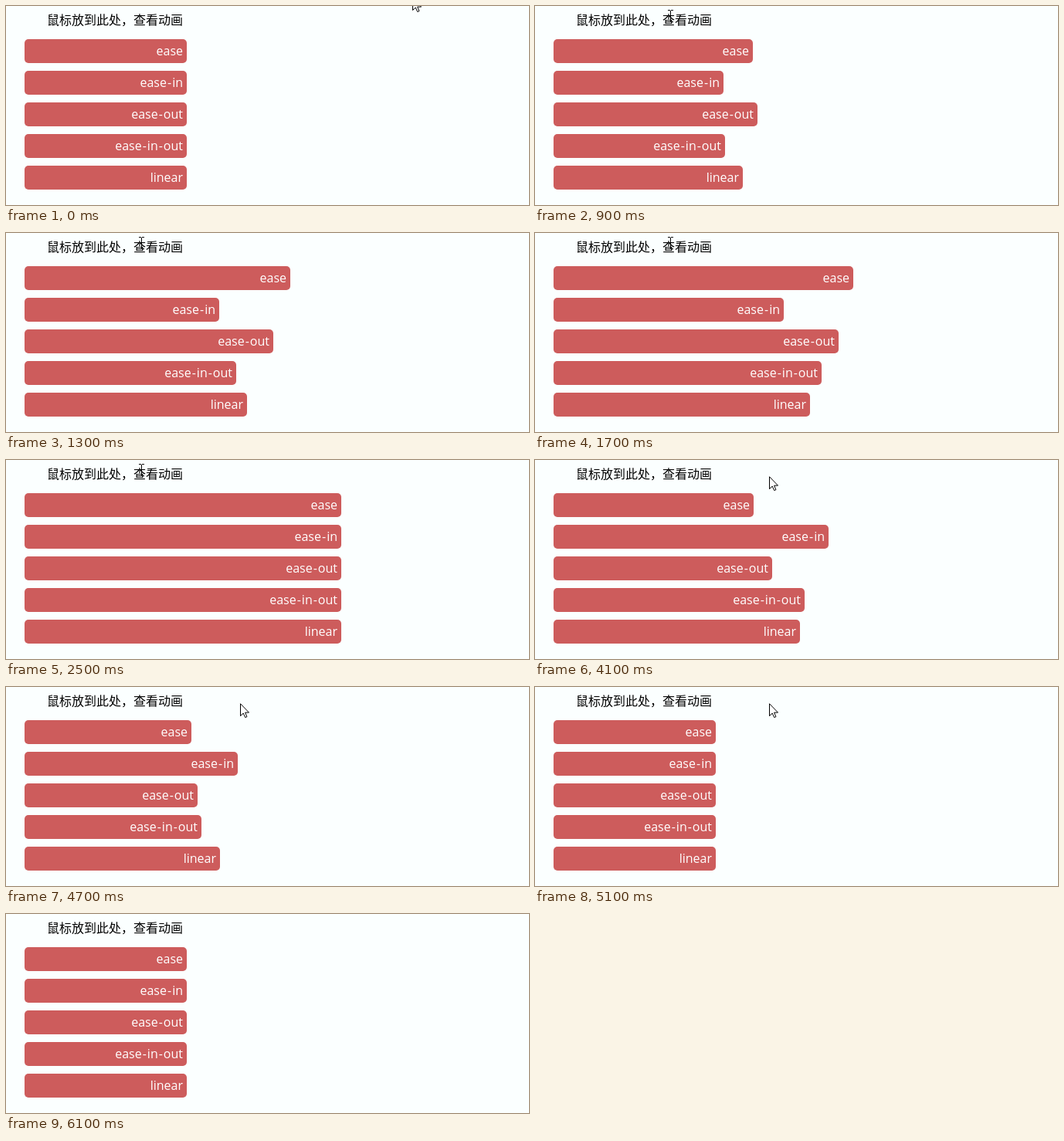
Write an HTML page that moves like this. It is 677 px wide and 258 px high and loops after 7300 ms.

```html
<!DOCTYPE html>
<html lang="zh-CN">
<head>
<meta charset="utf-8">
<title>transition-timing-function</title>
<style>
  html, body {
    margin: 0;
    width: 100%;
    height: 100%;
    overflow: hidden;
    background: #fbffff;
  }
  body { position: relative; }
  h1 {
    position: absolute;
    left: 53px;
    top: 7px;
    margin: 0;
    font: 400 16px/21px "Noto Sans CJK SC", "Noto Sans CJK", sans-serif;
    white-space: nowrap;
    color: #000;
  }
  .bar {
    position: absolute;
    left: 24px;
    box-sizing: border-box;
    width: 210px;
    height: 31px;
    padding-right: 5px;
    border-radius: 5px;
    background: #cd5c5c;
    color: #fff;
    font: 16px/31px "Open Sans", "Noto Sans", sans-serif;
    text-align: right;
    white-space: nowrap;
  }
  .bar span { margin: 0 1px; }
  svg {
    position: absolute;
    left: 0;
    top: 0;
    overflow: visible;
    visibility: hidden;
  }
</style>
</head>
<body>
<h1>鼠标放到此处，查看动画</h1>
<svg id="arrow" width="12" height="19">
  <path d="M.5 .7V16.5L4.2 13L6.7 18.5L8.9 17.6L6.6 12.1H11.5Z" fill="#fff" stroke="#000"/>
</svg>
<svg id="beam" width="7" height="16">
  <path d="M0 .5h3m1 0h3M3.5 1v14M0 15.5h3m1 0h3" fill="none" stroke="#000"/>
</svg>
<script>
  const LOOP = 7300, STEP = 100;
  const GROW = { start: 578, span: 1840 };
  const SHRINK = { start: 3273, span: 1818 };
  const curves = {
    'ease': [.25, .1, .25, 1],
    'ease-in': [.42, 0, 1, 1],
    'ease-out': [0, 0, .58, 1],
    'ease-in-out': [.42, 0, .58, 1],
    'linear': [0, 0, 1, 1]
  };
  // time, shape, x, y
  const pointer = [
    [0, 'arrow', 526, -11],
    [100],
    [500, 'arrow', 238, 21],
    [600, 'beam', 172, 5],
    [3100, 'beam', 198, 9],
    [3200, 'arrow', 238, 21],
    [3300, 'arrow', 251, 16],
    [3400, 'arrow', 303, 21],
    [5600, 'arrow', 414, 21],
    [5700, 'arrow', 560, 4],
    [5800, 'arrow', 611, -1],
    [5900, 'arrow', 635, 10],
    [6000, 'arrow', 666, 13],
    [6100]
  ];

  const bars = Object.entries(curves).map(([name, curve], i) => {
    const el = document.createElement('div');
    el.className = 'bar';
    el.style.top = 43 + 41 * i + 'px';
    el.innerHTML = name.replaceAll('-', '<span>-</span>');
    document.body.append(el);
    return { el, curve };
  });
  const shapes = ['arrow', 'beam'].map(id => document.getElementById(id));
  shapes.forEach(s => document.body.append(s));

  const cubic = (s, a, b) => 3 * s * (1 - s) * ((1 - s) * a + s * b) + s ** 3;

  function bezier(p, [x1, y1, x2, y2]) {
    let lo = 0, hi = 1;
    for (let i = 0; i < 24; i++) {
      const mid = (lo + hi) / 2;
      if (cubic(mid, x1, x2) < p) lo = mid; else hi = mid;
    }
    return cubic(hi, y1, y2);
  }

  function eased(t, phase, curve) {
    const p = (t - phase.start) / phase.span;
    return p <= 0 ? 0 : p >= 1 ? 1 : bezier(p, curve);
  }

  function draw(t) {
    for (const { el, curve } of bars) {
      const grown = eased(t, GROW, curve) - eased(t, SHRINK, curve);
      el.style.width = Math.round(210 + 200 * grown) + 'px';
    }
    const [, id, x, y] = pointer.findLast(k => k[0] <= t);
    for (const s of shapes) {
      const on = s.id === id;
      s.style.visibility = on ? 'visible' : 'hidden';
      if (on) s.style.transform = `translate(${x}px, ${y}px)`;
    }
  }

  const begin = performance.now();
  function tick() {
    const t = (performance.now() - begin) % LOOP;
    draw(Math.floor(t / STEP) * STEP);
    requestAnimationFrame(tick);
  }
  tick();
</script>
</body>
</html>
```
